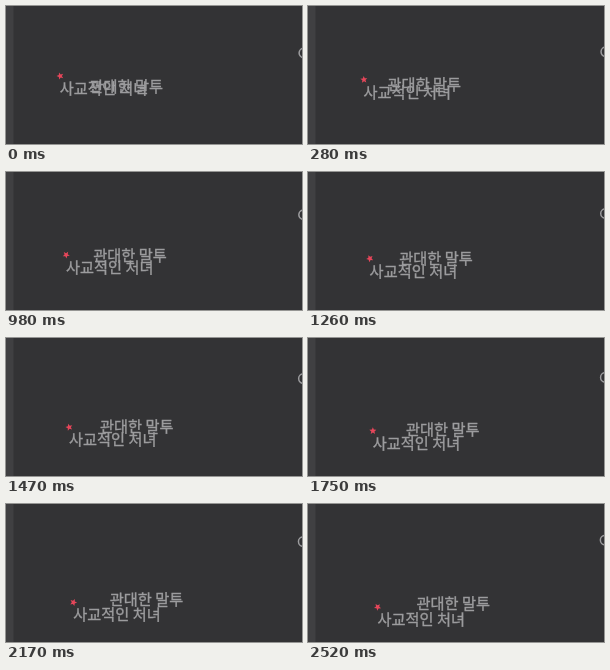
An HTML page with a canvas for the animation above (2.59 s loop, 296 by 138 pixels).

```html
<!DOCTYPE html>
<html lang="ko">
<head>
<meta charset="utf-8">
<title>Drifting words</title>
<style>
  html, body { margin: 0; width: 100%; height: 100%; overflow: hidden; background: #333335; }
  canvas { display: block; width: 296px; height: 138px; }
</style>
</head>
<body>
<canvas id="stage" width="296" height="138"></canvas>
<script>
const ctx = document.getElementById('stage').getContext('2d');
const LOOP = 2590, STEP = 70, BOUNCE = 0.35;
const GRAY = '#9c9c9e';

function word(text, x, y) {
  ctx.fillStyle = ctx.strokeStyle = GRAY;
  ctx.lineWidth = 0.35;
  ctx.fillText(text, x, y);
  ctx.strokeText(text, x, y);
}

function star(x, y, r, angle) {
  ctx.beginPath();
  for (let i = 0; i < 10; i++) {
    const a = angle + i * Math.PI / 5;
    const d = i % 2 ? r * 0.45 : r;
    ctx.lineTo(x + d * Math.cos(a), y + d * Math.sin(a));
  }
  ctx.closePath();
  ctx.fillStyle = '#e6465a';
  ctx.fill();
}

function ring(x, y, r) {
  ctx.beginPath();
  ctx.arc(x, y, r, 0, Math.PI * 2);
  ctx.strokeStyle = GRAY;
  ctx.lineWidth = 1.5;
  ctx.stroke();
}

function draw(s) {
  ctx.fillStyle = '#333335';
  ctx.fillRect(0, 0, 296, 138);
  ctx.fillStyle = '#404042';
  ctx.fillRect(0, 0, 7.5, 138);

  ctx.font = '15.25px "Noto Sans CJK KR", "Noto Sans CJK", sans-serif';

  // This word reverses when it meets the other one
  const away = Math.abs(s - BOUNCE);
  word('관대한 말투', 78.6 + 13.8 * away, 82.8 + 10.2 * away);
  word('사교적인 처녀', 53.8 + 6.2 * s, 88 + 13.1 * s);

  star(54.2 + 6.1 * s, 70 + 13.1 * s, 3.7, -1.9 + 0.9 * s);
  ring(297.8 - 0.3 * s, 47 - 4.35 * s, 4.7);
}

function tick(now) {
  const t = now % LOOP;
  draw(Math.floor(t / STEP) * STEP / 1000);
  requestAnimationFrame(tick);
}

draw(0);
requestAnimationFrame(tick);
</script>
</body>
</html>
```
